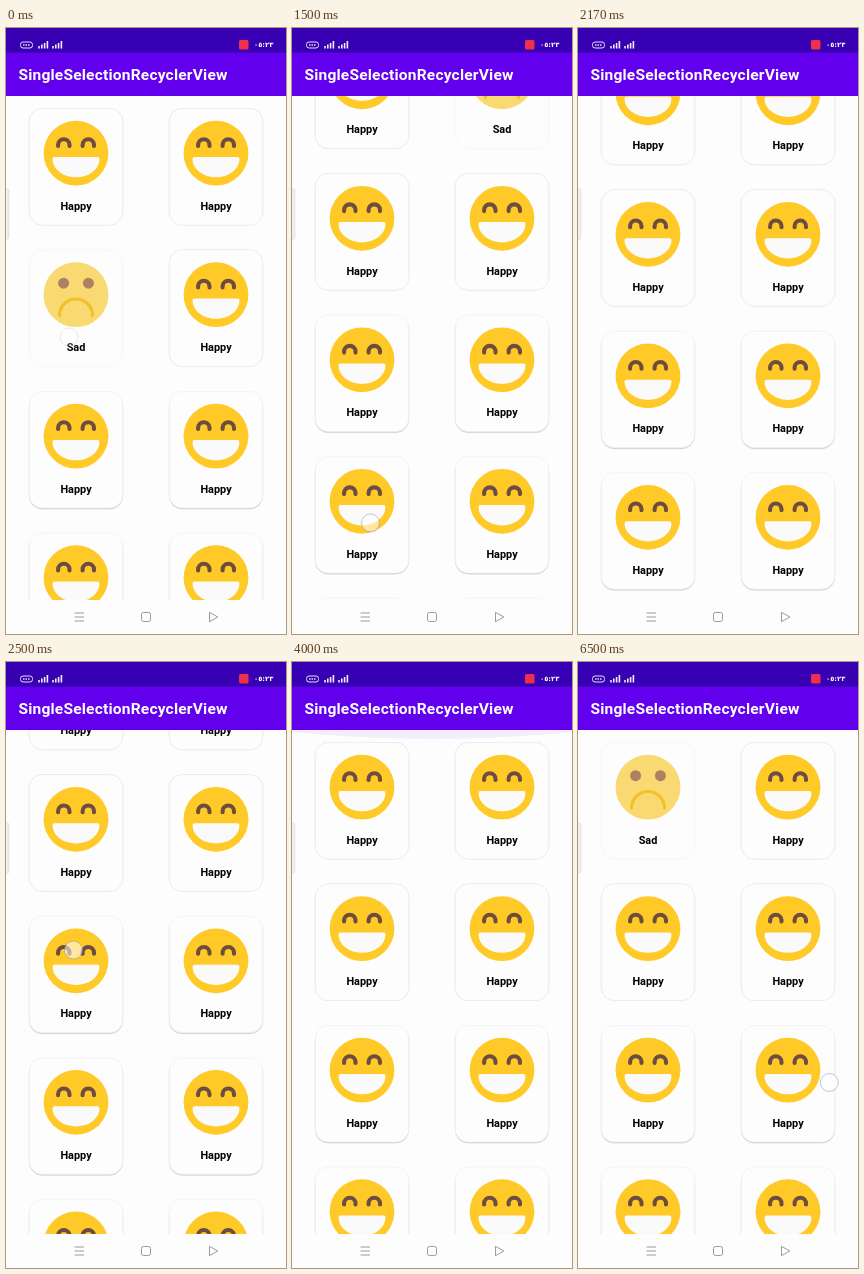
These frames come from a looping animation (280 by 606 pixels, 6.67 s). An HTML page:

```html
<!DOCTYPE html>
<html lang="en">
<head>
<meta charset="utf-8">
<style>
  html, body { margin: 0; width: 100%; height: 100%; overflow: hidden; background: #fdfdfd; }
  svg { display: block; width: 100vw; height: 100vh; }
  text { font-family: Roboto, sans-serif; font-weight: 700; }
  .label { font-size: 10.9px; text-anchor: middle; }
  .clock { font: 700 6.8px "DejaVu Sans", sans-serif; }
  .nav { fill: none; stroke: #9b9b9b; stroke-linejoin: round; }
</style>
</head>
<body>
<svg viewBox="0 0 280 606">
  <defs>
    <clipPath id="viewport"><rect y="68" width="280" height="504"/></clipPath>
    <path id="eye" d="M52.1 118v-1a5.7 5.7 0 0 1 11.4 0v1" fill="none" stroke="#6d4c41" stroke-width="4.1" stroke-linecap="round"/>
    <path id="bars" d="M33 20.5v-2.5m2.8 2.5v-4m2.8 4v-5.5m2.8 5.5v-7.5" stroke="#f1ebfa" stroke-width="1.6"/>
    <g id="happy">
      <circle cx="70" cy="125.2" r="32.4" fill="#ffca28"/>
      <use href="#eye"/><use href="#eye" x="24.5"/>
      <path d="M48.5 129h43q2 0 2 2a23.5 18.3 0 0 1-47 0q0-2 2-2z" fill="#fafafa"/>
      <text class="label" x="70" y="181.8">Happy</text>
    </g>
    <g id="sad">
      <circle cx="70" cy="125.2" r="32.4" fill="#f9da72"/>
      <g fill="#ad7f63"><circle cx="57.6" cy="113.7" r="5.5"/><circle cx="82.4" cy="113.7" r="5.5"/></g>
      <path d="M53.5 146a16.5 16.5 0 0 1 33 0" fill="none" stroke="#f2c028" stroke-width="3.1" stroke-linecap="round"/>
      <text class="label" x="70" y="181.8">Sad</text>
    </g>
  </defs>

  <rect width="280" height="606" fill="#fdfdfd"/>
  <g clip-path="url(#viewport)">
    <g id="list"></g>
    <path id="topGlow" d="M0 68H280V70Q140 84 0 70z" fill="#6200ee"/>
    <path id="bottomGlow" d="M0 572H280V570Q140 556 0 570z" fill="#6200ee"/>
  </g>

  <rect width="280" height="68" fill="#6200ee"/>
  <rect width="280" height="24.6" fill="#3700b3"/>
  <text x="12.4" y="52.2" fill="#fff" font-size="15.55" letter-spacing=".2">SingleSelectionRecyclerView</text>

  <rect x="14.5" y="14" width="12" height="6" rx="2.5" fill="none" stroke="#e6dcf5"/>
  <path d="M17 17h7" stroke="#e6dcf5" stroke-width="1.4" stroke-dasharray="1.5 1"/>
  <use href="#bars"/><use href="#bars" x="14"/>
  <rect x="233" y="12" width="9.5" height="9.5" rx="1.5" fill="#f0304a"/>
  <text class="clock" x="248" y="19.4" fill="#fff">٠٥:٢٣</text>

  <rect x="-2" y="161" width="4.8" height="50" rx="1.5" fill="#f0f0f0" stroke="#dedede" stroke-width=".8"/>
  <g class="nav">
    <path d="M68.5 585h9.5m-9.5 4h9.5m-9.5 4h9.5"/>
    <rect x="135.5" y="584.5" width="9" height="9" rx="2"/>
    <path d="M203.5 584.3v9.4l8.3-4.7z"/>
  </g>
  <circle id="touch" r="9" fill="#fff" fill-opacity=".55" stroke="#8080b4" stroke-opacity=".45"/>
</svg>
<script>
const LOOP = 6670, STEP = 1000 / 6;
const ROWS = 6, PITCH = 141.5, COLUMN = 140, VIEW = 504;
const BOTTOM = ROWS * PITCH - VIEW;
const $ = id => document.getElementById(id);

// time and scroll offset at the turns of the scrolling
const scrollKeys = [[1167, 0], [1833, 152.8], [2500, 250.8], [2833, BOTTOM], [3167, BOTTOM], [3333, 306.2], [4000, 0]];

// a tap selects the card with this index
const taps = [[-100, 2], [500, 3], [1000, 1], [3000, 9], [4833, 2], [5167, 0]]
  .map(([time, card]) => ({ time, card }));

// a held finger sticks to a point of the scrolling content
const holds = [[1330, 1900, 78.5, 571.3], [2330, 2670, 67.5, 538.8], [3160, 3510, 76, 669.2],
  [5830, 5990, 256, 426], [6490, LOOP, 251.3, 420.5]]
  .map(([start, end, x, y]) => ({ start, end, x, y }));

const clamp = v => Math.max(0, Math.min(1, v));
const pulse = (t, start, peak, end) => clamp(Math.min((t - start) / (peak - start), (end - t) / (end - peak)));

function scrollAt(t) {
  return scrollKeys.slice(1).reduce((offset, [time, to], i) => {
    const [from, start] = scrollKeys[i];
    return offset + (to - start) * clamp((t - from) / (time - from));
  }, 0);
}

function touchAt(t) {
  const hold = holds.find(h => t >= h.start && t <= h.end);
  if (hold) return { x: hold.x, y: hold.y, opacity: 1 };
  const tap = taps.find(({ time }) => t > time - 90 && t < time + 165);
  if (!tap) return { x: 0, y: 0, opacity: 0 };
  return {
    x: 63 + tap.card % 2 * COLUMN,
    y: 167.5 + Math.floor(tap.card / 2) * PITCH,
    opacity: 1 - clamp((t - tap.time) / 165)
  };
}

function svg(parent, tag, attrs = {}) {
  const node = document.createElementNS("http://www.w3.org/2000/svg", tag);
  return parent.appendChild(set(node, attrs));
}

function set(node, attrs) {
  for (const name in attrs) node.setAttribute(name, attrs[name]);
  return node;
}

const cards = Array.from({ length: ROWS * 2 }, (_, i) => {
  const top = Math.floor(i / 2) * PITCH;
  const group = svg($("list"), "g", { transform: `translate(${i % 2 * COLUMN} ${top})` });
  const panel = svg(group, "rect", { x: 23.3, y: 80.5, width: 93.4, height: 116.5, rx: 13, fill: "#fdfdfd", "stroke-width": .7 });
  return { top, panel, face: svg(group, "use") };
});

function draw(t) {
  const scroll = scrollAt(t);
  const selected = taps.filter(tap => tap.time <= t + 1).pop().card;
  set($("list"), { transform: `translate(0 ${-scroll})` });

  cards.forEach(({ top, panel, face }, i) => {
    const sad = i === selected;
    set(face, { href: sad ? "#sad" : "#happy" });
    set(panel, { stroke: sad ? "#f4f4f4" : "#efefef" });
    // the shadow falls further the lower a card sits on screen
    const drop = .5 + Math.max(0, 80 + top - scroll) / 450;
    panel.style.filter = sad ? "none" : `drop-shadow(0 ${drop}px .7px rgba(0,0,0,.18))`;
  });

  set($("topGlow"), { opacity: .06 * pulse(t, 3833, 4000, 4667) });
  set($("bottomGlow"), { opacity: .06 * pulse(t, 2667, 2833, 3333) });

  const { x, y, opacity } = touchAt(t);
  set($("touch"), { cx: x, cy: y - scroll, opacity });
}

// the screen refreshes six times a second
function tick() {
  const step = Math.floor((performance.now() % LOOP + 4) / STEP);
  draw(Math.min(step, 39) * STEP);
  requestAnimationFrame(tick);
}
tick();
</script>
</body>
</html>
```
